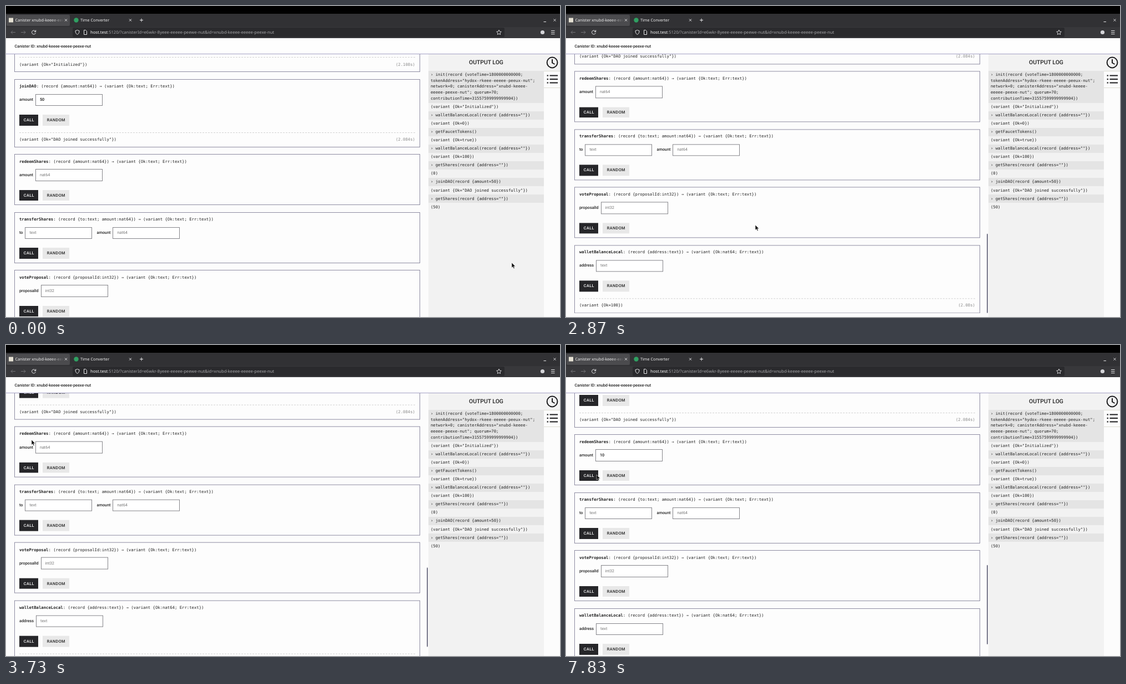
These frames come from a looping animation (998 by 561 pixels, 8000 ms). An HTML page:

```html
<!DOCTYPE html>
<html lang="en">
<head>
<meta charset="utf-8">
<title>Canister console</title>
<style>
  html, body { margin: 0; width: 100%; height: 100%; overflow: hidden; background: #fcfcfc; }
  #stage {
    position: relative; width: 998px; height: 561px; overflow: hidden; background: #fcfcfc;
    color: #222; font: 500 7.28px/10px Roboto, sans-serif; text-rendering: geometricPrecision;
    white-space: nowrap; --loop: 8s linear infinite; --step: 8s step-end infinite;
  }
  :where(#stage div, #stage svg) { position: absolute; left: 0; top: 0; }
  .mono, .card code { font: 400 7.28px/10px "DejaVu Sans Mono", monospace; }

  /* browser chrome */
  #chrome { width: 998px; height: 58px; background: #38383b; color: #f2f2f2; font: 400 7.2px/10px "Noto Sans", sans-serif; }
  #top { width: 998px; height: 14px; background: #000; }
  #tabs { top: 14px; width: 998px; height: 24px; background: #313134; }
  #tab { left: 1px; top: 16px; width: 114px; height: 20px; border-radius: 2px; background: #4b4b4e; }
  #tabName {
    left: 16.5px; top: 21px; width: 87px; overflow: hidden;
    -webkit-mask: linear-gradient(90deg, #000 75%, transparent); mask: linear-gradient(90deg, #000 75%, transparent);
  }
  #tabName2 { left: 134px; top: 21px; }
  #field { left: 120px; top: 39px; width: 778px; height: 17px; border-radius: 2px; background: #2a2a2d; }
  #url { left: 152px; top: 42.5px; font-size: 7.6px; color: #a5a5a8; }
  #url b { font-weight: 400; color: #fff; }

  /* page */
  #head { top: 58px; width: 998px; height: 28px; background: #fefefe; border-bottom: 1px solid #a3a0c4; }
  #head span { position: absolute; left: 15.5px; top: 9.5px; }
  #main { top: 87px; width: 761px; height: 474px; overflow: hidden; }
  #page { left: 15px; top: -91px; width: 731px; display: flex; flex-direction: column; gap: 12.5px; animation: scroll var(--loop); }
  .card { position: relative; flex: none; box-sizing: border-box; height: 92px; border: 1px solid #8e8ca2; background: #fdfdfd; }
  .card.done { height: 123px; }
  .card code { position: absolute; left: 8px; top: 7.5px; }
  .card .out { top: 103.5px; }
  .card .time { left: auto; right: 8px; top: 103.5px; color: #8a8a8a; }
  .card hr { position: absolute; left: 8px; right: 8px; top: 95px; margin: 0; border: 0; border-top: 1px dashed #d2d2d2; }
  .row { left: 8px; top: 26px; display: flex; align-items: center; gap: 4px; }
  .in {
    position: relative; box-sizing: border-box; width: 121px; height: 21.5px; margin-right: 4px;
    border: 1px solid #85858a; background: #fff; color: #777; font-weight: 400;
  }
  .in span { position: absolute; left: 7px; top: 4.8px; }
  .in .val { color: #111; font-weight: 500; }
  .btn { top: 63.5px; height: 19.5px; line-height: 19.5px; padding: 0 7.4px 0 7.8px; letter-spacing: .4px; }
  .call { left: 8px; background: #262629; color: #fff; }
  .rand { left: 50px; background: #e8e8e8; }
  #bar { left: 758px; top: 362.5px; width: 2px; height: 143.5px; border-radius: 1px; background: #77778a; animation: thumb var(--loop), fade var(--loop); }

  /* output log */
  #log { left: 761px; top: 87px; width: 208px; height: 474px; background: #f2f2f2; }
  #log h2 { margin: 0; position: absolute; left: 0; top: 7.5px; width: 208px; text-align: center; font: 500 10.4px/14px Roboto, sans-serif; }
  #rows { top: 29.6px; width: 208px; }
  #rows p { margin: 0; padding: 2.05px 4px; line-height: 10.92px; white-space: pre; }
  #rows .cmd { background: #e4e4e4; }
  #side { left: 969px; top: 87px; width: 29px; height: 29.5px; background: #f2f2f2; }
  #side2 { left: 969px; top: 116.5px; width: 29px; height: 29px; border: solid #deded2; border-width: 1px 0; }
  #icons { left: 969px; top: 87px; }

  /* selection, typing and pointer */
  .sel1, .sel2 { padding: .8px 0; }
  .sel1 { animation: word var(--step); }
  .sel2 { animation: line var(--step); }
  #hint { animation: hint var(--step); }
  #one { animation: one var(--step); }
  #zero { margin-left: 4.1px; animation: zero var(--step); }
  #caret { left: 7px; top: 5px; width: .8px; height: 9.5px; background: #111; animation: caret var(--step); }
  #mouse { width: 0; height: 0; animation: mouse 8s ease-in-out infinite; }
  #mouse svg { overflow: visible; }
  #arrow { animation: arrow var(--step); }
  #beam { animation: beam var(--step); }

  @keyframes scroll {
    0%, 32% { transform: none; animation-timing-function: cubic-bezier(.3, .1, .3, 1); }
    37.3%, 44.125% { transform: translateY(-158px); animation-timing-function: cubic-bezier(.215, .61, .355, 1); }
    51.625%, 100% { transform: translateY(-106px); }
  }
  @keyframes thumb {
    0%, 32% { transform: none; animation-timing-function: cubic-bezier(.3, .1, .3, 1); }
    37.3%, 44.125% { transform: translateY(50.5px); animation-timing-function: cubic-bezier(.215, .61, .355, 1); }
    51.625%, 100% { transform: translateY(33.9px); }
  }
  @keyframes fade {
    0%, 29% { opacity: 0; }
    32%, 78.5% { opacity: 1; }
    84.6%, 93.4% { opacity: 0; }
    96.5%, 100% { opacity: 1; }
  }
  @keyframes word { 0%, 60%, 100% { background: none; color: inherit; } 53.75% { background: #3584dc; color: #fff; } }
  @keyframes line { 0%, 60%, 100% { background: none; color: inherit; } 56.625% { background: #3584dc; color: #fff; } }
  @keyframes hint { 0% { opacity: 1; } 86.625%, 100% { opacity: 0; } }
  @keyframes one { 0% { opacity: 0; } 86.625%, 100% { opacity: 1; } }
  @keyframes zero { 0% { opacity: 0; } 88.375%, 100% { opacity: 1; } }
  @keyframes caret {
    0%, 95.9%, 100% { opacity: 0; transform: none; }
    78.375% { opacity: 1; transform: none; }
    86.625% { opacity: 1; transform: translateX(4.1px); }
    88.375% { opacity: 1; transform: translateX(8.2px); }
  }
  @keyframes mouse {
    0%, .3% { transform: translate(911px, 463px); }
    7.5% { transform: translate(690px, 566px); }
    28.4% { transform: translate(552px, 566px); animation-timing-function: linear; }
    28.75% { transform: translate(541px, 560px); animation-timing-function: ease-out; }
    34%, 39.1% { transform: translate(341px, 395px); }
    46.6% { transform: translate(46px, 171px); }
    51.6%, 60% { transform: translate(48px, 176.5px); }
    66.25%, 93.4% { transform: translate(88px, 201px); }
    97.8%, 100% { transform: translate(55px, 234px); }
  }
  @keyframes arrow { 0%, 95.4%, 100% { opacity: 1; } 49.6% { opacity: 0; } }
  @keyframes beam { 0%, 95.4%, 100% { opacity: 0; } 49.6% { opacity: 1; } }
</style>
</head>
<body>
<div id="stage">
  <div id="chrome">
    <div id="top"></div><div id="tabs"></div><div id="tab"></div><div id="field"></div>
    <div id="tabName">Canister xnubd-keeee-eeeee</div>
    <div id="tabName2">Time Converter</div>
    <div id="url"><b>host.test</b>:5120/?canisterId=e6wkr-8yeee-eeeee-peewe-nut&amp;id=xnubd-keeee-eeeee-peexe-nut</div>
    <svg width="998" height="58" fill="none" stroke="#e6e6e8">
      <path fill="#e6e2d4" stroke="none" d="M5 21.5h8v8H5z"/>
      <circle cx="126.5" cy="25.5" r="4.2" fill="#2fa062" stroke="none"/>
      <circle cx="966.5" cy="47.5" r="3.6" fill="#d4d4d8" stroke="none"/>
      <path d="M106 23.5l4 4m0-4l-4 4M222 23.5l4 4m0-4l-4 4M241 25.5h6m-3-3v6M968.5 28.5h4.5M986.5 23.5l4 4m0-4l-4 4"/>
      <path stroke="#727276" d="M17 47.5h-8m3-3l-3 3 3 3M27 47.5h8m-3-3l3 3-3 3"/>
      <path d="M53.2 46a3.5 3.5 0 1 0 .2 2.5M53.7 43.5v3h-3"/>
      <path d="M128.5 43.5l3.5 1.2c0 3.5-1 5.3-3.5 6.8-2.5-1.5-3.5-3.3-3.5-6.8zM140.5 43.5h3l2 2v6h-5z"/>
      <path stroke-width=".9" d="M888 43.2l1.3 2.8 3 .4-2.2 2.1.5 3-2.6-1.5-2.6 1.5.5-3-2.2-2.1 3-.4z"/>
      <path d="M982 44.5h6.5M982 47.5h6.5M982 50.5h6.5"/>
    </svg>
  </div>

  <div id="main"><div id="page"></div></div>
  <div id="bar"></div>

  <div id="log"><h2>OUTPUT LOG</h2><div id="rows" class="mono"></div></div>
  <div id="side"></div><div id="side2"></div>
  <div id="head"><span>Canister ID: xnubd-keeee-eeeee-peexe-nut</span></div>
  <svg id="icons" width="29" height="60" fill="none" stroke="#1c1c1e" stroke-width="2">
    <circle cx="15" cy="15" r="9.4"/><path d="M15 9v6.5l4.5 2.5"/>
    <path d="M10.5 38.5H25M10.5 45H25M10.5 51.5H25M5.5 38.5H8M5.5 45H8M5.5 51.5H8"/>
  </svg>

  <div id="mouse">
    <svg id="arrow" width="9" height="12"><path d="M0 0v9.2l2.1-1.9 1.5 3.3 1.6-.7-1.5-3.2h2.9z" fill="#111" stroke="#fff" stroke-width=".5"/></svg>
    <svg id="beam" width="6" height="10"><path d="M-2-4.5h1.5l.5.5.5-.5H2M0-4v8M-2 4.5h1.5L0 4l.5.5H2" fill="none" stroke="#222"/></svg>
  </div>
</div>
<script>
  const input = (label, inner) => `${label}<div class="in">${inner}</div>`;
  const hint = type => `<span>${type}</span>`;
  const value = text => `<span class="val">${text}</span>`;

  function card({ name, args, ok = 'text', fields, out, time, cls = ['', ''] }) {
    const sig = `: (record {${args}}) → (variant {Ok:${ok}; Err:text})`;
    const result = out ? `<hr><code class="out">${out}</code><code class="time">(${time}s)</code>` : '';
    return `<div class="card ${out ? 'done' : ''}">
      <code><b class="${cls[0]}">${name}</b><span class="${cls[1]}">${sig}</span></code>
      <div class="row">${fields}</div>
      <div class="btn call">CALL</div><div class="btn rand">RANDOM</div>${result}</div>`;
  }

  const typed = '<span id="hint">nat64</span><span id="one" class="val">1</span>' +
    '<span id="zero" class="val">0</span><div id="caret"></div>';

  document.getElementById('page').innerHTML = [
    { name: 'init', args: 'voteTime:int', fields: '', out: '(variant {Ok="Initialized"})', time: '2.108' },
    { name: 'joinDAO', args: 'amount:nat64', fields: input('amount', value(50)),
      out: '(variant {Ok="DAO joined successfully"})', time: '2.084' },
    { name: 'redeemShares', args: 'amount:nat64', fields: input('amount', typed), cls: ['sel1', 'sel2'] },
    { name: 'transferShares', args: 'to:text; amount:nat64',
      fields: input('to', hint('text')) + input('amount', hint('nat64')) },
    { name: 'voteProposal', args: 'proposalId:int32', fields: input('proposalId', hint('int32')) },
    { name: 'walletBalanceLocal', args: 'address:text', ok: 'nat64', fields: input('address', hint('text')),
      out: '(variant {Ok=100})', time: '2.08' },
  ].map(card).join('');

  const balance = 'walletBalanceLocal(record {address=""})';
  const shares = 'getShares(record {address=""})';
  const init = `init(record {voteTime=1800000000000;
tokenAddress="hydox-rkeee-eeeee-peeux-nut";
network=0; canisterAddress="xnubd-keeee-
eeeee-peexe-nut"; quorum=70;
contributionTime=31557599999999904})`;

  document.getElementById('rows').innerHTML = [
    [init, '(variant {Ok="Initialized"})'],
    [balance, '(variant {Ok=0})'],
    ['getFaucetTokens()', '(variant {Ok=true})'],
    [balance, '(variant {Ok=100})'],
    [shares, '(0)'],
    ['joinDAO(record {amount=50})', '(variant {Ok="DAO joined successfully"})'],
    [shares, '(50)'],
  ].map(([cmd, res]) => `<p class="cmd">› ${cmd}</p><p>${res}</p>`).join('');
</script>
</body>
</html>
```
